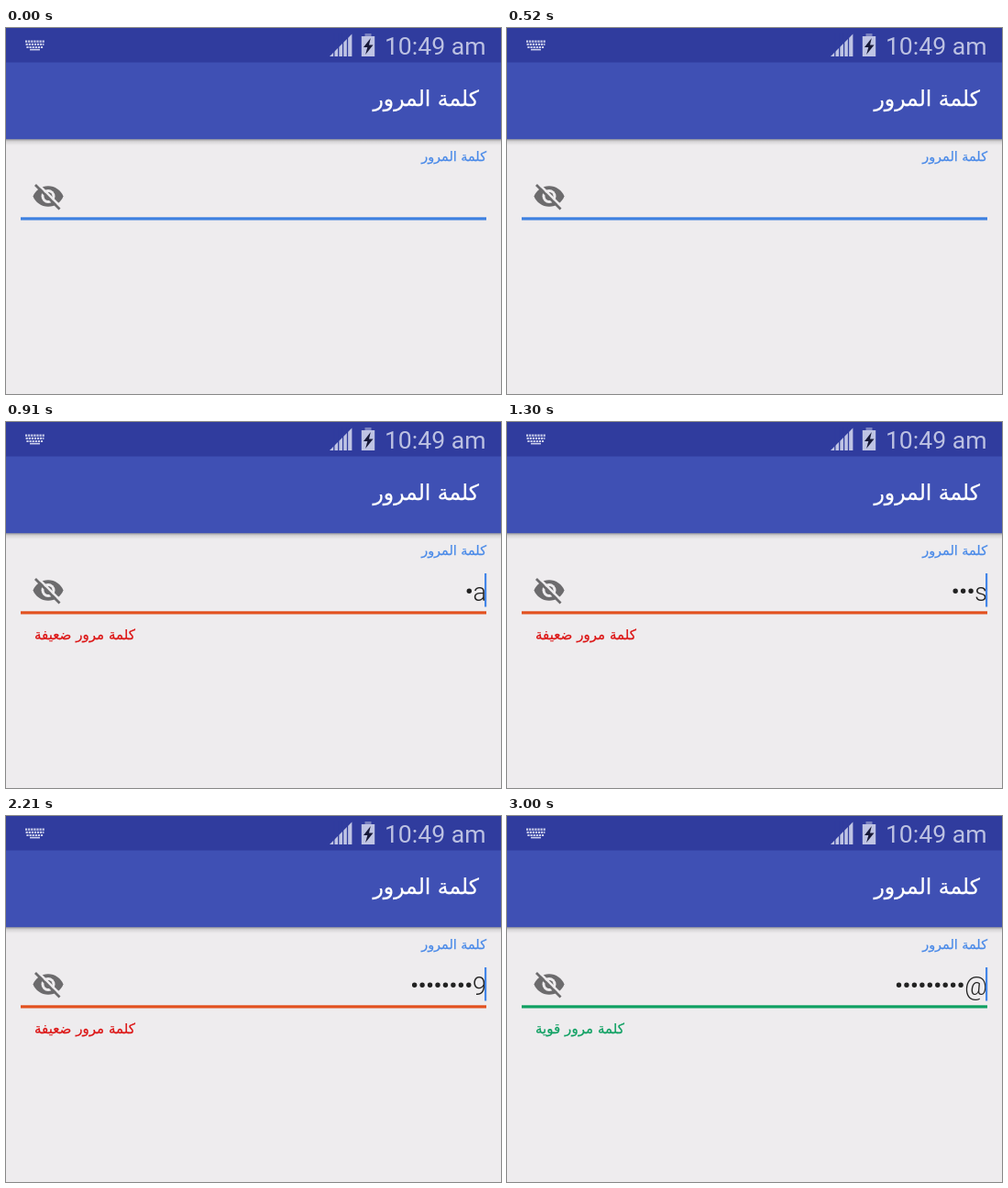
Recreate the animation shown at these times as an HTML page. Size 540 by 399 pixels, loop 3.13 s.

```html
<!DOCTYPE html>
<html lang="ar">
<head>
<meta charset="utf-8">
<title>كلمة المرور</title>
<style>
  html, body { margin: 0; width: 100%; height: 100%; overflow: hidden; background: #eeecee; }
  svg { display: block; width: 540px; height: 399px; }
  .ar { font-family: "DejaVu Sans", sans-serif; direction: rtl; stroke: currentColor; stroke-width: .25px; fill: currentColor; }
  .latin { font-family: Roboto, sans-serif; font-weight: 300; font-size: 27px; }
  .clock { font-weight: 400; font-size: 26.6px; }
</style>
</head>
<body>
<svg viewBox="0 0 540 399">
  <defs>
    <linearGradient id="shade" x2="0" y2="1">
      <stop stop-color="#000" stop-opacity=".36"/>
      <stop offset=".4" stop-color="#000" stop-opacity=".1"/>
      <stop offset="1" stop-color="#000" stop-opacity="0"/>
    </linearGradient>
  </defs>
  <rect width="540" height="399" fill="#eeecee"/>
  <rect y="121" width="540" height="7" fill="url(#shade)"/>
  <rect y="37" width="540" height="84.2" fill="#3f50b4"/>
  <rect width="540" height="37.5" fill="#303c9e"/>

  <!-- keyboard -->
  <g stroke="#ccd0ec" stroke-width="2.2" stroke-dasharray="2.2 .9">
    <path d="M21 14.6H42M21.6 17.8H41.4M22.4 21H40.6"/>
    <path d="M26 23.6H37" stroke-width="1.6" stroke-dasharray="none"/>
  </g>

  <!-- signal -->
  <path d="M353 31L377.4 6.5V31z" fill="#bfc4e4"/>
  <path d="M357.8 5v26M362.7 5v26M367.6 5v26M372.5 5v26" stroke="#303c9e" stroke-width="1.3"/>

  <!-- battery -->
  <path d="M391.5 6h7v3.5h-7z" fill="#7a82c0"/>
  <path d="M387.8 9h14.4v22h-14.4z" fill="#bfc4e4"/>
  <path d="M397.8 11l-7.8 10h4.3l-2.2 8 8.4-10.5H396z" fill="#181a38"/>

  <text class="latin clock" x="523.5" y="29" text-anchor="end" fill="#bcc1e2">10:49 am</text>
  <text class="ar" x="516" y="85" font-size="23.5" color="#fff">كلمة المرور</text>
  <text class="ar" x="524" y="145" font-size="14.4" color="#4a8ae8">كلمة المرور</text>

  <!-- crossed-out eye -->
  <g transform="translate(28 165.5) scale(1.5)" fill="#6c6b6d">
    <path d="M1 12C2.73 7.6 7 4.5 12 4.5S21.27 7.6 23 12C21.27 16.4 17 19.5 12 19.5S2.73 16.4 1 12z"/>
    <circle cx="12" cy="12" r="5" fill="#eeecee"/>
    <circle cx="12" cy="12" r="3"/>
    <path d="M3.9 2.4L22.5 21" stroke="#eeecee" stroke-width="1.8"/>
    <path d="M2.64 3.64L20.37 21.37" stroke="#6c6b6d" stroke-width="1.8"/>
  </g>

  <rect id="line" x="16" y="206.3" width="508" height="3.2"/>
  <text id="note" class="ar" x="31" y="237" font-size="15.1" text-anchor="end"></text>
  <path id="dots" stroke="#222" stroke-width="5.4" stroke-linecap="round" stroke-dasharray="0 8.45"/>
  <text id="last" class="latin" x="524" y="194.5" text-anchor="end" fill="#222"></text>
  <rect id="caret" x="522" y="165" width="2.2" height="36.5" fill="#4285e8"/>
</svg>
<script>
  const LOOP = 3130, STEP = 8.45;
  const PASSWORD = "password9@";
  const typedAt = [650, 910, 1040, 1300, 1560, 1690, 1820, 1950, 2210, 2870];
  const caretOff = [[0, 260], [520, 650], [2610, 2870]];
  const looks = {
    empty: ["#3d80e0", "#000", ""],
    weak: ["#e2511f", "#dc1414", "كلمة مرور ضعيفة"],
    strong: ["#0fa062", "#0fa062", "كلمة مرور قوية"]
  };
  const [line, note, dots, last, caret] =
    ["line", "note", "dots", "last", "caret"].map(id => document.getElementById(id));

  function draw(t) {
    const count = typedAt.filter(at => t >= at).length;
    const state = !count ? "empty" : count < PASSWORD.length ? "weak" : "strong";
    const [lineColor, noteColor, words] = looks[state];

    line.setAttribute("fill", lineColor);
    note.setAttribute("color", noteColor);
    note.setAttribute("opacity", t >= 2870 && t < 3000 ? 0.7 : 1);
    note.textContent = words;

    last.textContent = count ? PASSWORD[count - 1] : "";
    const end = 524 - last.getComputedTextLength() - STEP / 2;
    const span = (count - 2) * STEP + 0.1;
    dots.setAttribute("d", count > 1 ? `M${end} 184.3h${-span}` : "");

    const hidden = caretOff.some(([from, to]) => t >= from && t < to);
    caret.setAttribute("opacity", hidden ? 0 : 1);
  }

  const start = performance.now();
  function tick() {
    draw((performance.now() - start) % LOOP);
    requestAnimationFrame(tick);
  }
  tick();
</script>
</body>
</html>
```
